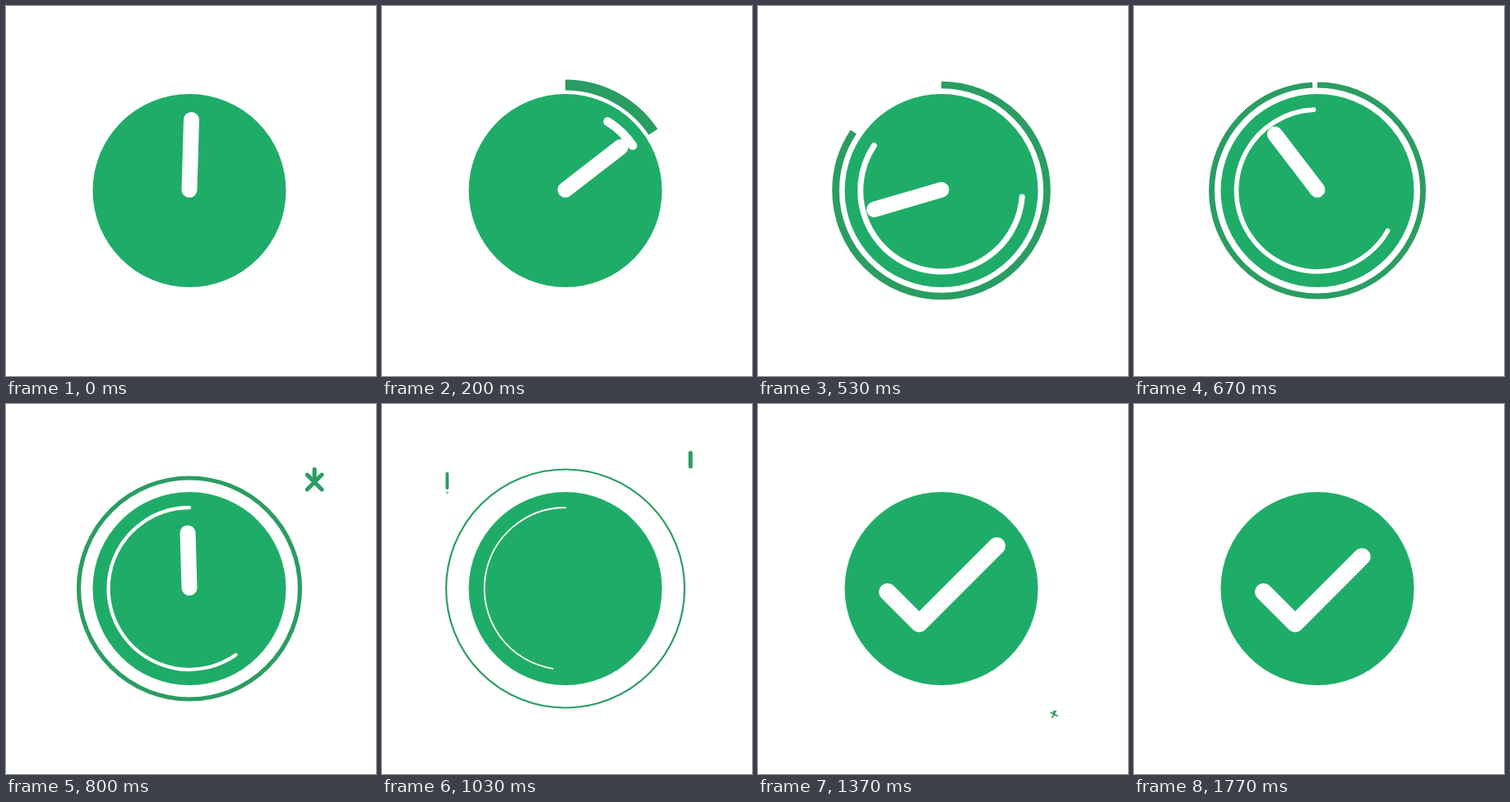
These frames come from a looping animation (450x450 px, 1810 ms). An HTML page with a canvas:

```html
<!DOCTYPE html>
<html lang="en">
<head>
<meta charset="utf-8">
<title>Timer to check mark</title>
<style>
html, body { margin: 0; width: 100%; height: 100%; overflow: hidden; background: #fff; }
canvas { display: block; width: 450px; height: 450px; }
</style>
</head>
<body>
<canvas id="stage" width="450" height="450"></canvas>
<script>
const ctx = document.getElementById('stage').getContext('2d');
const LOOP = 1810, STEP = 100 / 3, LAST = 53;
const GREEN = '#1fac68', DARK = '#2a9d62', WHITE = '#fff';
const CX = 223, CY = 224.5;

// x, y, arm length, first step
const sparks = [
  [375.2, 95, 12.6, 20],
  [79.3, 108, 9.6, 24],
  [360, 377.3, 5.2, 38]
];

const clamp = v => Math.min(1, Math.max(0, v));
const span = (k, from, to) => clamp((k - from) / (to - from));
const ease = u => u * u * (3 - 2 * u);
const rad = deg => deg * Math.PI / 180;

function stroke(color, width, cap) {
  ctx.strokeStyle = color;
  ctx.lineWidth = width;
  ctx.lineCap = cap;
  ctx.lineJoin = 'round';
  ctx.stroke();
}

function line(points, color, width) {
  ctx.beginPath();
  points.forEach(([x, y]) => ctx.lineTo(x, y));
  stroke(color, width, 'round');
}

// Angles in degrees, clockwise from the top
function arc(r, from, to, color, width, cap) {
  const a = Math.min(from, to), b = Math.max(from, to);
  if (width <= 0 || b - a < 0.01) return;
  ctx.beginPath();
  ctx.arc(CX, CY, r, rad(a - 90), rad(b - 90));
  stroke(color, width, cap);
}

function disc() {
  ctx.beginPath();
  ctx.arc(CX, CY, 117.5, 0, Math.PI * 2);
  ctx.fillStyle = GREEN;
  ctx.fill();
}

function rings(k) {
  const thin = 1 - span(k, 1, 36);
  const sweep = 360 * ease(span(k, 1, 21));
  const r = 128.5 + 1.5 * Math.max(0, k - 20);
  arc(r, 0, sweep, DARK, 15.2 * thin, 'butt');
  arc(98.5, 6.3 * (k - 1), sweep, WHITE, 12.4 * thin, 'round');
}

function hand(k) {
  const len = 85 * (1 - ease(span(k, 21, 31)));
  if (len <= 0) return;
  const a = rad(360 * ease(span(k, 0, 25)));
  line([[CX, 223.5], [CX + len * Math.sin(a), 223.5 - len * Math.cos(a)]], WHITE, 19);
}

function check(k) {
  const short = 38.5, long = 94.5 - 13.2 * ease(span(k, 41, 53));
  const drawn = (short + long) * ease(span(k, 31, 41));
  if (drawn <= 0) return;
  const a = Math.min(short, drawn), b = drawn - a;
  const points = [[157.5, 228.5], [157.5 + a, 228.5 + a]];
  if (b > 0) points.push([196 + b, 267 - b]);
  line(points, WHITE, 21);
}

function spark(k, [x, y, size, start]) {
  const age = k - start;
  if (age <= 0) return;

  // Spinning cross
  const u = age / 8;
  if (u < 1) {
    const s = size * ease(1 - Math.abs(2 * u - 1));
    const turn = 90 * ease(u);
    for (const deg of [turn, turn + 90]) {
      const dx = s * Math.cos(rad(deg)), dy = s * Math.sin(rad(deg));
      line([[x - dx, y - dy], [x + dx, y + dy]], DARK, 0.4 * s);
    }
  }

  // Bar rising from it
  const reach = 2.82 * size;
  const head = reach * (1 - (1 - span(age, 2, 10)) ** 2);
  const tail = reach * span(age, 0, 15) ** 2;
  if (head > tail) line([[x, y - head], [x, y - tail]], DARK, 0.4 * size);
}

function draw(ms) {
  const k = Math.min(LAST, Math.max(1, Math.floor((ms % LOOP + 3.4) / STEP)));
  ctx.fillStyle = WHITE;
  ctx.fillRect(0, 0, 450, 450);
  disc();
  rings(k);
  hand(k);
  check(k);
  sparks.forEach(s => spark(k, s));
}

let origin;
function tick(now) {
  if (origin === undefined) origin = now;
  draw(now - origin);
  requestAnimationFrame(tick);
}
draw(0);
requestAnimationFrame(tick);
</script>
</body>
</html>
```
